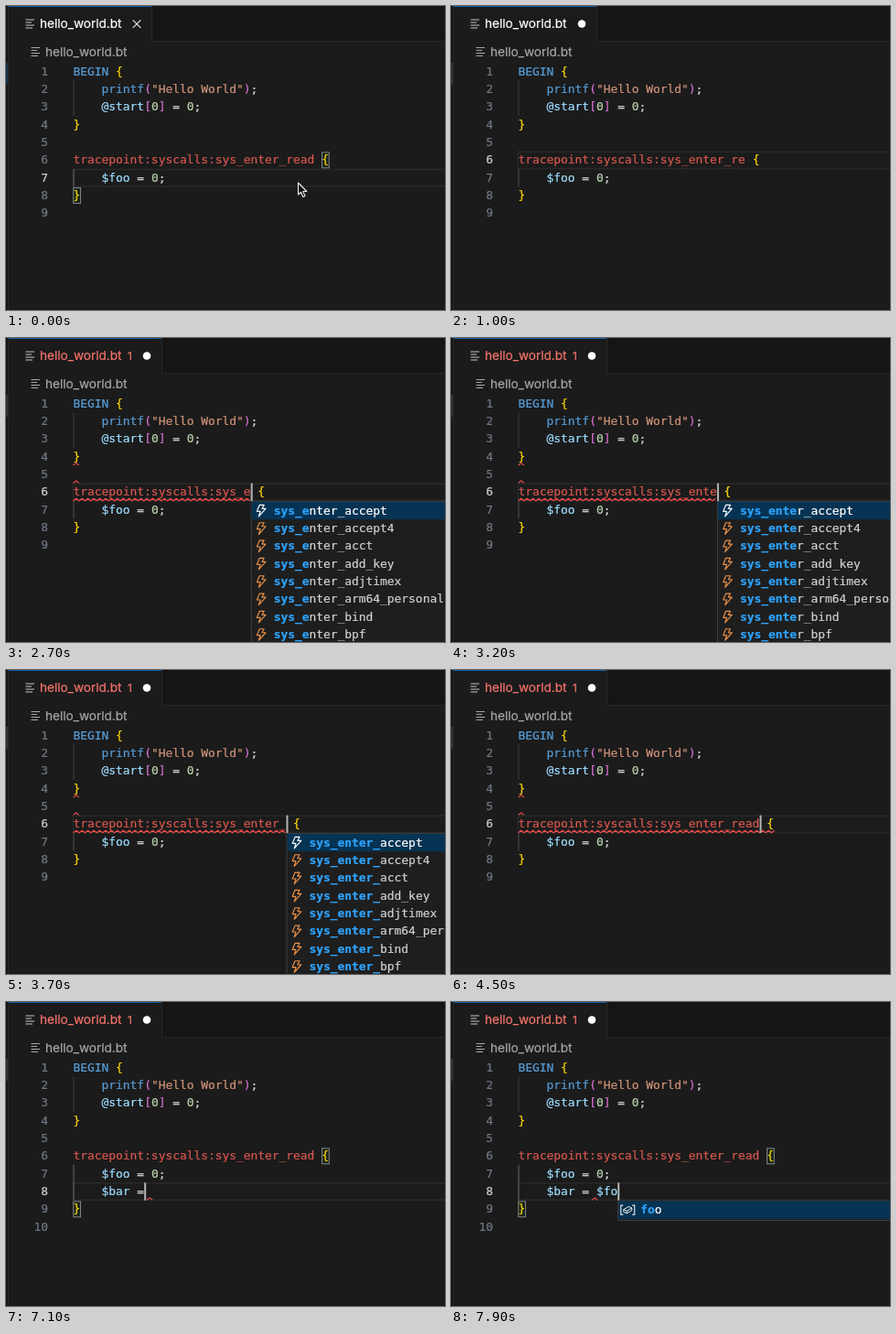
Recreate the animation shown at these times as an HTML page. Size 480 px wide and 332 px high, loop 8 s.

```html
<!DOCTYPE html>
<html lang="en">
<head>
<meta charset="utf-8">
<title>Editor typing</title>
<style>
  html, body { margin: 0; width: 100%; height: 100%; overflow: hidden; background: #1b1b1b; }
  svg { display: block; width: 480px; height: 332px; }
  text { white-space: pre; font: 12.9px "DejaVu Sans Mono", monospace; }
  text, tspan { fill: currentColor; stroke: currentColor; stroke-width: .22px; }
  .ui { font: 13.6px Inter, sans-serif; }
</style>
</head>
<body>
<svg id="stage" viewBox="0 0 480 332"></svg>
<script>
const LOOP = 8000, STEP = 100;
const LEFT = 73.5, CHAR = 7.766, TOP = 62, ROW = 19.33, BASE = 13.8;
const RED = '#f14c4c', TITLE_RED = '#f4736a', PLAIN = '#d0d0d0';
const stage = document.getElementById('stage');

const EVENT = 'sys_enter_read';
const eventKeys = [2100, 2200, 2300, 2500, 2600, 2900, 3000, 3200, 3300, 3500, 3800, 3900, 4000, 4200];
const ASSIGN = '$bar = $fo';
const assignKeys = [5700, 6400, 6500, 6700, 6900, 7000, 7200, 7400, 7600, 7800];
const calls = ['accept', 'accept4', 'acct', 'add_key', 'adjtimex', 'arm64_personality', 'bind', 'bpf', 'brk'];
const readCalls = ['read', 'readahead', 'readlinkat', 'readv', 'reboot', 'recvfrom', 'recvmmsg', 'recvmsg', 'remap_file_pages'];

const colX = col => LEFT + col * CHAR;
const rowY = line => TOP + (line - 1) * ROW;
const pressed = (keys, t) => keys.filter(k => k <= t).length;
const escapeText = s => s.replace(/&/g, '&amp;').replace(/</g, '&lt;');
const span = (s, color, extra = '') => `<tspan color="${color}" ${extra}>${escapeText(s)}</tspan>`;
const rect = (x, y, w, h, fill, extra = '') =>
  `<rect x="${x}" y="${y}" width="${w}" height="${h}" fill="${fill}" ${extra}/>`;
const path = (d, stroke, width = 1, extra = '') =>
  `<path d="${d}" fill="none" stroke="${stroke}" stroke-width="${width}" ${extra}/>`;
const label = (x, y, content, extra = '') => `<text x="${x}" y="${y}" ${extra}>${content}</text>`;

const rules = [
  [/^"[^"]*"/, '#ce9178'],
  [/^tracepoint:syscalls:\w+/, '#d6564f'],
  [/^(BEGIN|printf)\b/, '#569cd6'],
  [/^([@$]\w+|[a-z]\w*)/, '#9cdcfe'],
  [/^\d+/, '#b5cea8'],
  [/^[{}]/, '#ffd70a'],
  [/^[()[\]]/, '#d670d2'],
  [/^(\s+|.)/, PLAIN]
];

function highlight(code) {
  let out = '';
  while (code) {
    const [rule, color] = rules.find(([r]) => r.test(code));
    const token = code.match(rule)[0];
    out += span(token, color);
    code = code.slice(token.length);
  }
  return out;
}

function squiggle(x1, x2, line) {
  const y = rowY(line) + ROW - .3;
  let d = `M${x1} ${y}`;
  for (let x = x1 + 3.22, up = true; x < x2 + 1; x += 3.22, up = !up) d += `L${x} ${up ? y - 2.4 : y}`;
  return path(d, RED, 1.15);
}

const listIcon = (x, y, color) =>
  path(`M${x} ${y}h9.5M${x} ${y + 3}h6.5M${x} ${y + 6}h9.5M${x} ${y + 9}h7.5`, color, 1.1);

function tab(dirty, error) {
  const right = error ? 170 : 159;
  const mark = error ? 154 : 143;
  return rect(0, 0, 480, 38, '#151515') +
    rect(0, 38, 480, 1, '#282828') +
    rect(2, 0, right - 2, 39, '#1b1b1b') +
    rect(right, 0, 1, 39, '#282828') +
    rect(2, 0, right - 2, 1, '#0d5fa6') +
    listIcon(21.5, 15, '#c4c8c8') +
    label(37, 24.3, 'hello_world.bt', `class="ui" color="${error ? TITLE_RED : '#ffffff'}"`) +
    (error ? label(133, 24, '1', `class="ui" style="font-size:12px" color="${TITLE_RED}"`) : '') +
    (dirty ? `<circle cx="${mark}" cy="19.5" r="4.3" fill="#fff"/>`
           : path('M138.7 15.3l8.6 8.6M147.3 15.3l-8.6 8.6', '#e4e4e4', 1.2)) +
    listIcon(27.5, 45.5, '#a4a8a8') +
    label(43, 55, 'hello_world.bt', 'class="ui" color="#a6a6a6"');
}

const bolt = (x, y, color) =>
  path(`M${x + 3.5} ${y - 6}h5l-2.2 4h4l-7.6 8.5l1.8-5.6h-3.8z`, color, 1.15, 'stroke-linejoin="round"');

const variableIcon = (x, y) =>
  path(`M${x + 3} ${y - 5}h-2.5v10h2.5M${x + 13} ${y - 5}h2.5v10h-2.5`, '#e8e8e8', 1.1) +
  path(`M${x + 3.5} ${y - .5}l5.5-3.2l3.5 1.6v2.6l-5.5 3.2l-3.5-1.6zl3.5 1.6l5.5-3.2M${x + 7} ${y + 1.1}v2.6`, '#e8e8e8');

function popup(x, line, items, match, isEvent) {
  const y = rowY(line) + ROW;
  let out = rect(x + .5, y + .5, 600, items.length * ROW + 2, '#1e1e1e', 'stroke="#404040"');
  items.forEach((item, i) => {
    const top = y + .8 + i * ROW, mid = top + ROW / 2, chosen = i === 0;
    if (chosen) out += rect(x + 1, top, 600, ROW, '#063353');
    out += isEvent ? bolt(x + 6, mid, chosen ? '#ffffff' : '#ea9148') : variableIcon(x + 3, mid);
    out += label(x + 25, top + BASE,
      span(item.slice(0, match), '#2ea3fc', 'font-weight="bold"') +
      span(item.slice(match), chosen ? '#ffffff' : PLAIN));
  });
  return out;
}

function bracketBox(col, line) {
  return rect(colX(col) + .2, rowY(line) + 1.2, CHAR, ROW - 2.4, '#1a271a', 'stroke="#858585"');
}

function pointer(t) {
  const p = Math.min(1, Math.max(0, (t - 100) / 400));
  const e = p * p * (3 - 2 * p);
  return `<path transform="translate(${319.5 + 17 * e} ${193 - 24 * e})" d="M0 0V13L3 10.3L5.2 15.5L7.5 14.5L5.3 9.5H9.3Z"
    fill="#111" stroke="#eee" stroke-width="1.1" stroke-linejoin="round"/>`;
}

function draw(t) {
  const deleted = t < 1000 ? 0 : Math.min(14, Math.floor((t - 900) / 600 * 14));
  const eventLen = t < 2100 ? 14 - deleted : pressed(eventKeys, t);
  const assignLen = pressed(assignKeys, t);
  const newLine = t >= 5200;
  const active = t < 500 ? 7 : t < 4900 ? 6 : t < 5200 ? 7 : 8;
  const caretCol = active === 6 ? 20 + eventLen : active === 7 ? 13 : 4 + assignLen;
  const eventError = t >= 1500 && t < 4700;
  const closing = newLine ? 9 : 8;
  const caretX = colX(caretCol);

  const lines = [
    'BEGIN {', '    printf("Hello World");', '    @start[0] = 0;', '}', '',
    `tracepoint:syscalls:${EVENT.slice(0, eventLen)} {`, '    $foo = 0;',
    ...(newLine ? ['    ' + ASSIGN.slice(0, assignLen)] : []), '}', ''
  ];

  let out = rect(0, 0, 480, 332, '#1b1b1b') + tab(t >= 1000, eventError || t >= 6900);
  out += rect(0, 0, 2, 332, '#161616') + rect(0, 62, 2, 24, t < 500 ? '#17304a' : '#303034') +
    rect(2, 0, 1, 332, '#282828');

  out += rect(LEFT, rowY(active) + .5, 420, ROW - 1, 'none', 'stroke="#292929" stroke-width="1.6"');
  out += rect(73.5, rowY(2), 1, ROW * 2, '#3c3c3c');
  out += rect(73.5, rowY(7), 1, ROW * (closing - 7), active === 6 ? '#505050' : '#686868');
  if (active !== 6) out += bracketBox(35, 6) + bracketBox(0, closing);

  lines.forEach((code, i) => {
    const base = rowY(i + 1) + BASE;
    out += label(46, base, i + 1, `text-anchor="end" color="${i + 1 === active ? '#cccccc' : '#6e7681'}"`);
    out += label(LEFT, base, highlight(code));
  });

  if (eventError) {
    const full = eventLen === 0 || eventLen === 14;
    out += squiggle(LEFT, colX(1), 4) + squiggle(LEFT, colX(1), 5) +
      squiggle(LEFT, colX(20 + eventLen + (full ? 2 : 0)), 6);
  }
  if (t >= 7000) out += squiggle(154, 161, 8);

  const edits = [500, 1500, ...eventKeys, 4900, 5200, ...assignKeys];
  const lastEdit = edits.filter(k => k <= t).pop() ?? -500;
  if ((t - lastEdit) % 1000 < 500) out += rect(caretX, rowY(active), 2, ROW, '#b4b5b3');

  if (t >= 2100 && t < 4300) {
    const names = (eventLen > 10 ? readCalls : calls).map(n => 'sys_enter_' + n)
      .filter(n => n.startsWith(EVENT.slice(0, eventLen)));
    out += popup(caretX, 6, names, eventLen, true);
  }
  if (t >= 5700 && t < 6400) out += popup(caretX, 8, ['foo'], 0, false);
  if (t >= 7400) out += popup(caretX, 8, t < 7600 ? ['bar', 'foo'] : ['foo'], assignLen - 8, false);
  if (t < 1000) out += pointer(t);
  stage.innerHTML = out;
}

const start = performance.now();
let shown = -1;
function tick() {
  const t = Math.floor((performance.now() - start) % LOOP / STEP) * STEP;
  if (t !== shown) draw(shown = t);
  requestAnimationFrame(tick);
}
tick();
</script>
</body>
</html>
```
